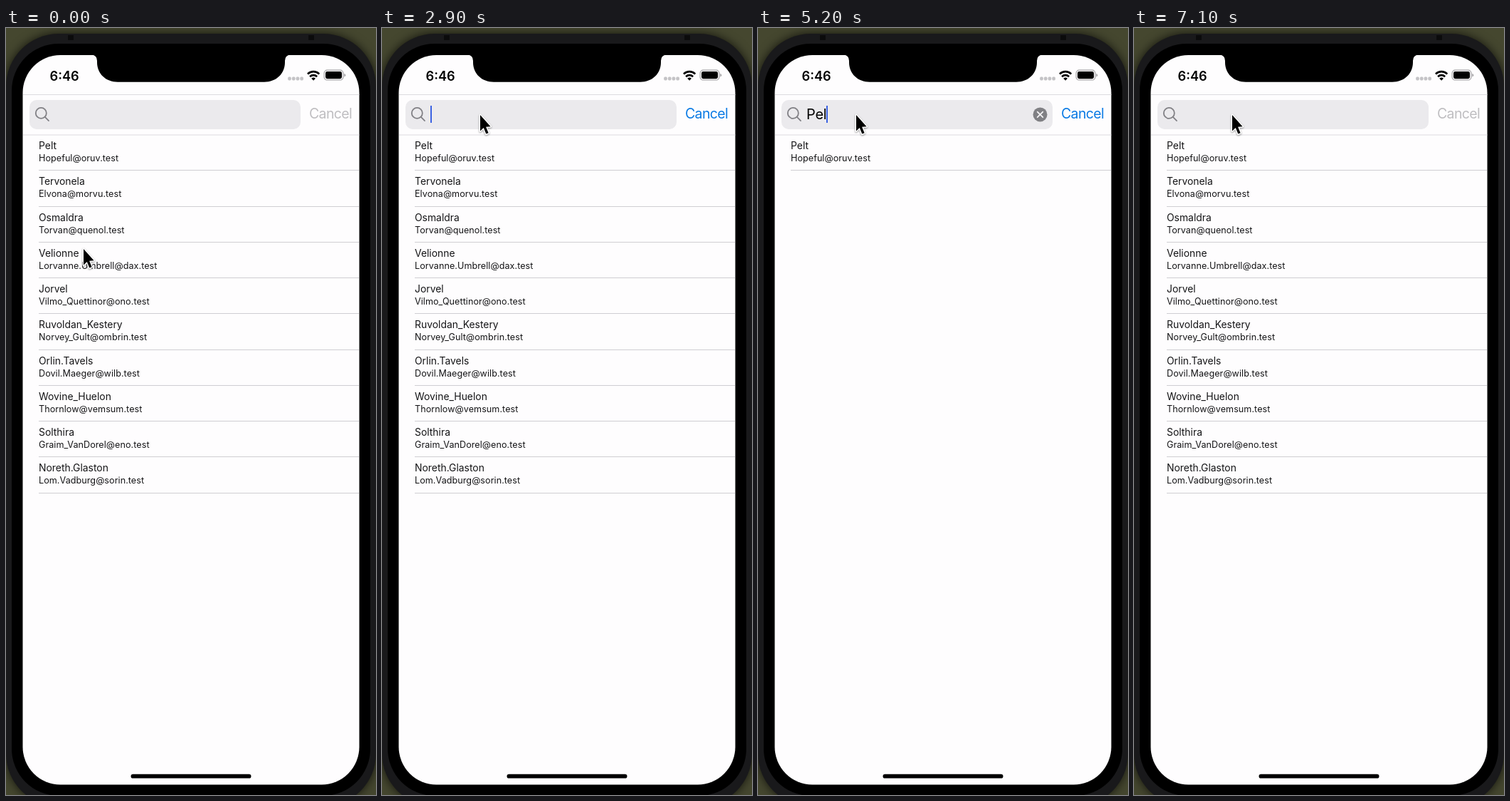
Recreate the animation shown at these times as an HTML page. Size 520x1076 px, loop 8 s.

```html
<!DOCTYPE html>
<html lang="en">
<head>
<meta charset="utf-8">
<title>User search</title>
<style>
  html, body { margin: 0; width: 100%; height: 100%; overflow: hidden; background: #45472f; }
  body { position: relative; font-family: Inter, "Liberation Sans", sans-serif; color: #151517; }
  svg { position: absolute; left: 0; top: 0; }

  .clock, .cancel, .query, ul { position: absolute; white-space: nowrap; }
  .clock { left: 61.5px; top: 55.5px; font: 600 18.2px/22px Inter, sans-serif; color: #000; }
  .cancel { left: 426px; top: 108px; font-size: 19.5px; line-height: 25px; letter-spacing: -.65px; color: #bfbec1; }

  ul { left: 46px; top: 150px; width: 450px; margin: 0; padding: 0; list-style: none; }
  li { box-sizing: border-box; height: 50.28px; padding-top: 6px; border-bottom: 1px solid #cfced2;
       font-size: 13.9px; line-height: 18px; }
  small { display: block; font-size: 12.6px; letter-spacing: .05px; }

  .query { left: 68px; top: 100.5px; height: 41px; display: flex; align-items: center; color: #000; }
  .query span { font-size: 0; line-height: 24px; letter-spacing: -.02em; }
  .query i { width: 2px; height: 24px; background: #3b62e2; opacity: 0; }

  .body { filter: drop-shadow(0 0 7px #000b); }

  /* One shared 8 s clock */
  .cancel, .query span, .clear, li:not(:first-child), .pointer {
    animation: 8s step-end -20ms infinite;
  }
  .cancel { animation-name: focus; }
  .clear { visibility: hidden; animation-name: show; }
  li:not(:first-child) { animation-name: filter; }
  .query span:nth-child(1) { animation-name: key1; }
  .query span:nth-child(2) { animation-name: key2; }
  .query span:nth-child(3) { animation-name: key3; }
  .query span:nth-child(4) { animation-name: key4; }
  .query i { animation: caret 8s linear -20ms infinite; }
  .pointer { animation-name: move; }

  @keyframes focus { 0%, 88.75%, 100% { color: #bfbec1; } 36.25% { color: #0a7ae4; } }
  @keyframes show { 0%, 88.75%, 100% { visibility: hidden; } 52.5% { visibility: visible; } }
  @keyframes filter { 0%, 88.75%, 100% { visibility: visible; } 52.5% { visibility: hidden; } }
  @keyframes key1 { 0%, 88.75%, 100% { font-size: 0; } 52.5% { font-size: 20px; } }
  @keyframes key2 { 0%, 88.75%, 100% { font-size: 0; } 57.5% { font-size: 20px; } }
  @keyframes key3 { 0%, 88.75%, 100% { font-size: 0; } 63.75% { font-size: 20px; } }
  @keyframes key4 { 0%, 88.75%, 100% { font-size: 0; } 71.25% { font-size: 20px; } }
  @keyframes caret {
    0%, 36.24%, 88.75%, 100% { opacity: 0; }
    36.25%, 42.5% { opacity: 1; }
    45%, 47.5% { opacity: 0; }
    48.75%, 77.5% { opacity: 1; }
    80%, 82.5% { opacity: 0; }
    83.75%, 88.74% { opacity: 1; }
  }
  @keyframes move {
    0% { transform: translate(109px, 309px); }
    2.5% { transform: translate(88px, 268px); }
    3.75% { transform: translate(66px, 226px); }
    6.25% { transform: translate(74px, 208px); }
    7.5% { transform: translate(98px, 184px); }
    8.75% { transform: translate(119px, 163px); }
    10% { transform: translate(96px, 112px); }
    11.25% { transform: translate(52px, 70px); }
    12.5% { transform: translate(5px, 42px); }
    13.75% { transform: translate(40px, 66px); }
    15% { transform: translate(108px, 106px); }
    16.25% { transform: translate(137px, 122px); }
    17.5%, 100% { transform: translate(138px, 121px); }
  }
</style>
</head>
<body>
<svg width="520" height="1076" viewBox="0 0 520 1076">
  <!-- Phone body -->
  <rect class="body" y="8" width="520" height="1084" rx="74" fill="#19191b"/>
  <path d="M87 10h8v7h-8zM425 10h8v7h-8z" fill="#0b0b0c"/>
  <rect x="8" y="22" width="504" height="1055" rx="66"/>
  <rect x="23.5" y="38" width="473" height="1023.5" rx="53" fill="#fefdfe"/>
  <path d="M120 37.5Q128 38 128 46V48C128 64 140 75.7 157 75.7H363C380 75.7 392 64 392 48V46Q392 38 400 37.5Z"/>

  <!-- Status bar -->
  <g fill="#c4c3c6">
    <rect x="396.2" y="68.6" width="4.6" height="4.8" rx="1.6"/>
    <rect x="401.9" y="68.6" width="4.6" height="4.8" rx="1.6"/>
    <rect x="407.6" y="68.6" width="4.6" height="4.8" rx="1.6"/>
    <rect x="413.3" y="68.6" width="4.6" height="4.8" rx="1.6"/>
  </g>
  <g fill="none" stroke="#000" stroke-width="2.7">
    <path d="M424 64.6a11.4 11.4 0 0 1 16.2 0M427.1 68.2a7.2 7.2 0 0 1 10 0"/>
  </g>
  <path d="M432.1 73.8l-2.9-3a4.2 4.2 0 0 1 5.8 0z"/>
  <rect x="447.2" y="59.2" width="26.6" height="13.8" rx="4" fill="none" stroke="#a09fa2" stroke-width="1.2"/>
  <rect x="449" y="61" width="23" height="10.2" rx="2.4"/>
  <path d="M475.3 63.8q1.9 .8 1.9 2.4t-1.9 2.4z" fill="#a09fa2"/>

  <!-- Search bar -->
  <path d="M24 93.5H496.5M24 150H496.5" stroke="#dcdbdf"/>
  <rect x="33" y="101" width="381" height="41" rx="10" fill="#ebeaed"/>
  <g fill="none" stroke="#818085" stroke-width="1.8" stroke-linecap="round">
    <circle cx="49.3" cy="119.4" r="7.5"/>
    <path d="M54.8 124.9L60 130.1"/>
  </g>
  <g class="clear">
    <circle cx="396.5" cy="121.4" r="10" fill="#808084"/>
    <path d="M392.7 117.6l7.6 7.6m0-7.6l-7.6 7.6" stroke="#f4f3f5" stroke-width="1.8" stroke-linecap="round"/>
  </g>

  <rect x="175.5" y="1046.8" width="169" height="5.8" rx="2.9"/>
</svg>

<div class="clock">6:46</div>
<div class="query"><span>P</span><span>e</span><span>l</span><span>t</span><i></i></div>
<div class="cancel">Cancel</div>

<ul>
  <li>Pelt<small>Hopeful@oruv.test</small></li>
  <li>Tervonela<small>Elvona@morvu.test</small></li>
  <li>Osmaldra<small>Torvan@quenol.test</small></li>
  <li>Velionne<small>Lorvanne.Umbrell@dax.test</small></li>
  <li>Jorvel<small>Vilmo_Quettinor@ono.test</small></li>
  <li>Ruvoldan_Kestery<small>Norvey_Gult@ombrin.test</small></li>
  <li>Orlin.Tavels<small>Dovil.Maeger@wilb.test</small></li>
  <li>Wovine_Huelon<small>Thornlow@vemsum.test</small></li>
  <li>Solthira<small>Graim_VanDorel@eno.test</small></li>
  <li>Noreth.Glaston<small>Lom.Vadburg@sorin.test</small></li>
</ul>

<svg width="520" height="1076" viewBox="0 0 520 1076">
  <g class="pointer">
    <path d="M0 1V23.5L4.8 19L8.3 27.6L11.6 26.2L8.1 17.8L14.6 17.2Z" stroke="#fff" stroke-width="3"
      stroke-linejoin="round" paint-order="stroke" style="filter: drop-shadow(0 1.5px 1.2px #0006)"/>
  </g>
</svg>
</body>
</html>
```
